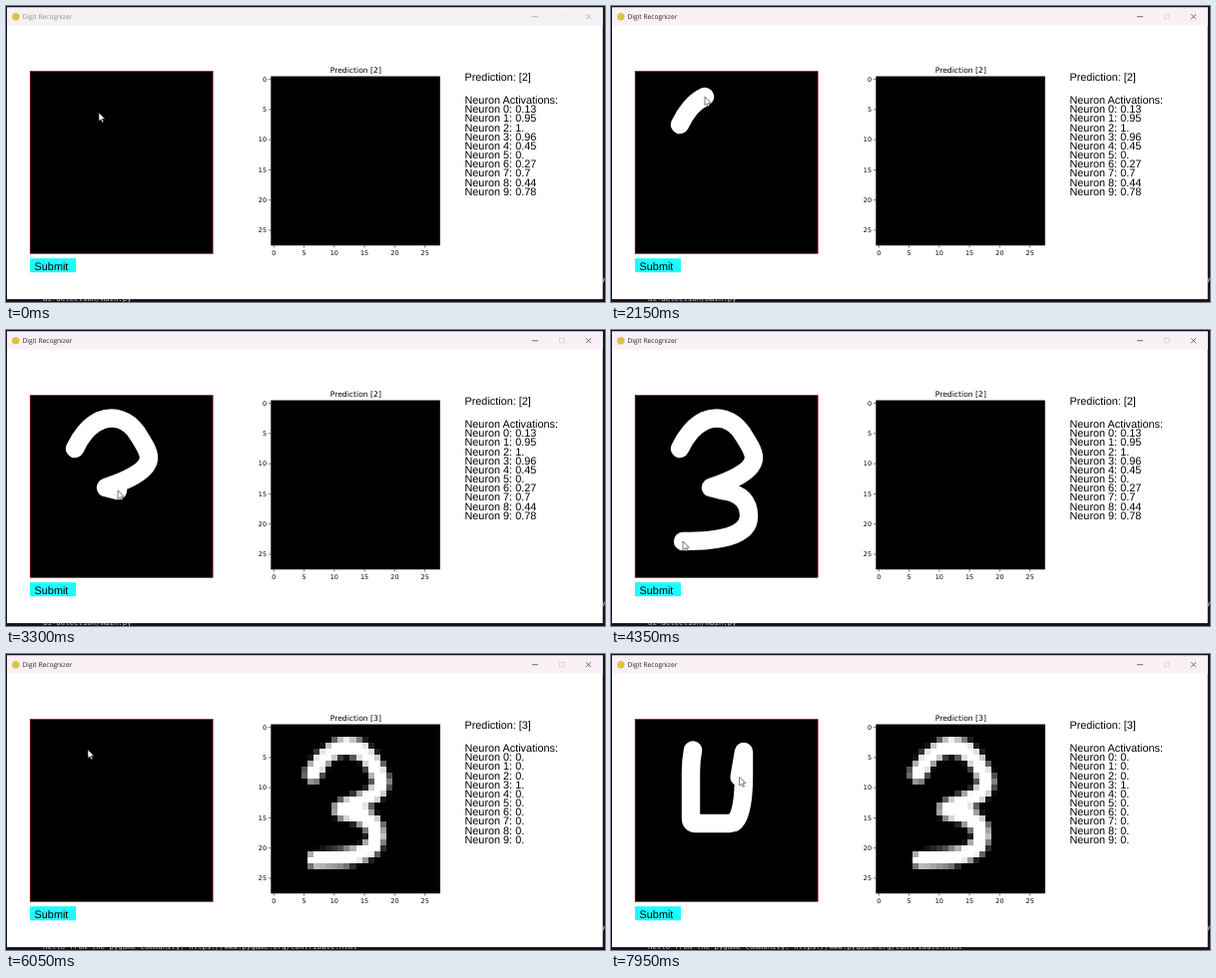
Write an HTML page with a canvas that moves like this. It is 600 by 297 pixels and loops after 8000 ms.

```html
<!DOCTYPE html>
<html lang="en">
<head>
<meta charset="utf-8">
<title>Digit Recognizer</title>
<style>
  html, body { margin: 0; width: 100%; height: 100%; overflow: hidden; background: #17121a; }
  svg { position: absolute; left: 0; top: 0; display: block; text-rendering: geometricPrecision; }
  #digit { position: absolute; left: 266px; top: 71px; width: 169px; height: 169px; image-rendering: pixelated; }
  .ui { font: 10.85px "Liberation Sans", Arial, sans-serif; fill: #000; }
  .plot { font: 6.4px "DejaVu Sans", sans-serif; fill: #000; }
  .plot .heading { font-size: 7.65px; }
  .console { font: 7.37px "DejaVu Sans Mono", monospace; fill: #c4c4c4; }
  .caption { font: 6.65px "Open Sans", sans-serif; fill: #222; }
  .bar { fill: #faf1f6; }
  .control { fill: none; stroke: #333; stroke-width: .7; }
  .maximize { stroke: #d2cbd0; }
  .inactive .bar { fill: #f4f2f5; }
  .inactive .caption { fill: #8c8c8c; }
  .inactive .control { stroke: #999; }
  .inactive .maximize { stroke: #e4e1e4; }
  .ink { fill: none; stroke: #fff; stroke-width: 18.4; stroke-linecap: round; stroke-linejoin: round; }
</style>
</head>
<body>
<svg id="stage" width="600" height="297" viewBox="0 0 600 297">
  <rect width="600" height="297" fill="#17121a"/>
  <text id="log" class="console" x="37" y="296.4"></text>
  <text class="console" x="596.5" y="275.5">y</text>
  <rect x="1" y="1.5" width="596.7" height="292.6" fill="#fff"/>
  <rect class="bar" x="1" y="1.5" width="596.7" height="18"/>
  <circle cx="9.8" cy="10.8" r="3.8" fill="#d9c544"/>
  <text class="caption" x="16.5" y="13.2">Digit Recognizer</text>
  <path class="control" d="M527 10.7h6M581 8.2l5 5m0-5l-5 5"/>
  <rect class="control maximize" x="554.5" y="8.3" width="4.6" height="4.6"/>

  <rect x="24.1" y="65.4" width="183.1" height="183.1" stroke="#c80000" stroke-width=".5"/>
  <g id="drawing"></g>
  <rect x="24" y="253.2" width="46" height="14" fill="#1cfcff"/>
  <text class="ui" x="28.6" y="265.4">Submit</text>

  <g id="plot" class="plot">
    <rect x="265.3" y="70.5" width="169.5" height="169.8"/>
    <text id="heading" class="heading" x="350.3" y="66.7" text-anchor="middle"></text>
  </g>
  <g id="report" class="ui"></g>
  <path id="cursor" d="M0 0V8.6L2 6.8L3.4 9.8L4.8 9.2L3.4 6.3H6.1Z" fill="#fff" stroke="#222" stroke-width=".6"/>
</svg>
<canvas id="digit" width="28" height="28"></canvas>
<script>
const LOOP = 8000, STEP = 50, FOCUS = 400, SUBMIT = 4950;
const BRUSH = 18.4;
const byId = id => document.getElementById(id);

function addNode(parent, name, attributes, text = "") {
  const node = document.createElementNS("http://www.w3.org/2000/svg", name);
  for (const [key, value] of Object.entries(attributes)) node.setAttribute(key, value);
  node.textContent = text;
  parent.append(node);
  return node;
}

const addText = (parent, x, y, text, anchor = "start") =>
  addNode(parent, "text", { x, y, "text-anchor": anchor }, text);

// Pointer gestures in order; those with "clear" leave ink until that time.
const gestures = [
  { from: 800, to: 1500, d: "M93 107L69 119" },
  { from: 1650, to: 2150, clear: SUBMIT, d: "M69 119C74 108 83 96 94 91" },
  { from: 2150, to: 3300, clear: SUBMIT,
    d: "M94 91C108 85 122 90 131 103C136 111 143 121 143 128C143 142 118 152 100 158L112 161" },
  { from: 3300, to: 4250, clear: SUBMIT, d: "M112 161C130 164 138 172 138 187C138 207 108 212 72 212" },
  { from: 4350, to: 4800, d: "M72 212L46 258" },
  { from: 5200, to: 6000, d: "M46 258L82 96" },
  { from: 6150, to: 7200, clear: LOOP, d: "M82 96.5Q80 107 80 118V165Q80 170 85 170H118L123 169" },
  { from: 7200, to: LOOP, clear: LOOP, d: "M123 169C131 164 133 142 133 122V98L127.5 130" }
];
for (const gesture of gestures) {
  gesture.path = addNode(byId("drawing"), "path", { d: gesture.d, class: "ink" });
  gesture.length = gesture.path.getTotalLength();
}

const states = [
  { digit: 2, values: "0.13 0.95 1. 0.96 0.45 0. 0.27 0.7 0.44 0.78".split(" "), log: "ai-detection/main.py" },
  { digit: 3, values: Array.from({ length: 10 }, (_, i) => i === 3 ? "1." : "0."),
    log: "Hello from the pygame community. https://www.pygame.org/contribute.html" }
];

function buildAxes() {
  const cell = 169.5 / 28, left = 265.3, top = 70.6, bottom = 240.2;
  let ticks = "";
  for (let n = 0; n <= 25; n += 5) {
    const offset = (n + .5) * cell;
    ticks += `M${left + offset} ${bottom}v2.3M${left} ${top + offset}h-2.3`;
    addText(byId("plot"), left + offset, 249.7, n, "middle");
    addText(byId("plot"), 261, top + offset + 2.3, n, "end");
  }
  addNode(byId("plot"), "path", { d: ticks, stroke: "#000", "stroke-width": .55 });
}

// The prediction image is the first drawing shrunk to 28 x 28.
function buildDigit() {
  const ctx = byId("digit").getContext("2d"), scale = 28 / 183.3;
  const drawing = gestures.filter(g => g.clear === SUBMIT).map(g => g.d).join("");
  ctx.fillRect(0, 0, 28, 28);
  ctx.setTransform(scale, 0, 0, scale, -24 * scale, -65.3 * scale);
  ctx.lineWidth = BRUSH;
  ctx.lineCap = ctx.lineJoin = "round";
  ctx.strokeStyle = "#fff";
  ctx.stroke(new Path2D(drawing.replace(/(?!^)M[\d.]+ [\d.]+/g, "")));
}

const report = byId("report");
const result = addText(report, 459.5, 75.3, "");
addText(report, 459.5, 98.3, "Neuron Activations:");
const neurons = states[0].values.map((_, i) => addText(report, 459.5, 107.3 + i * 9.17, ""));
buildAxes();
buildDigit();

let shown;
function show(state) {
  if (state === shown) return;
  shown = state;
  byId("heading").textContent = `Prediction [${state.digit}]`;
  result.textContent = `Prediction: [${state.digit}]`;
  neurons.forEach((node, i) => node.textContent = `Neuron ${i}: ${state.values[i]}`);
  byId("log").textContent = state.log;
  byId("digit").style.visibility = state === states[1] ? "visible" : "hidden";
}

const progress = (g, t) => Math.min(1, Math.max(0, (t - g.from) / (g.to - g.from)));

function movePointer(t) {
  const current = gestures.findLast(g => g.from <= t) || gestures[0];
  const { x, y } = current.path.getPointAtLength(progress(current, t) * current.length);
  byId("cursor").setAttribute("transform", `translate(${x} ${y})`);
}

function drawInk(g, t) {
  const visible = t > g.from && t < g.clear;
  g.path.style.display = visible ? "" : "none";
  g.path.style.strokeDasharray = `${progress(g, t) * g.length} ${g.length * 2}`;
}

function render() {
  const t = Math.floor(performance.now() % LOOP / STEP) * STEP;
  show(states[t < SUBMIT ? 0 : 1]);
  byId("stage").classList.toggle("inactive", t < FOCUS);
  movePointer(t);
  gestures.forEach(g => drawInk(g, t));
  requestAnimationFrame(render);
}
render();
</script>
</body>
</html>
```
